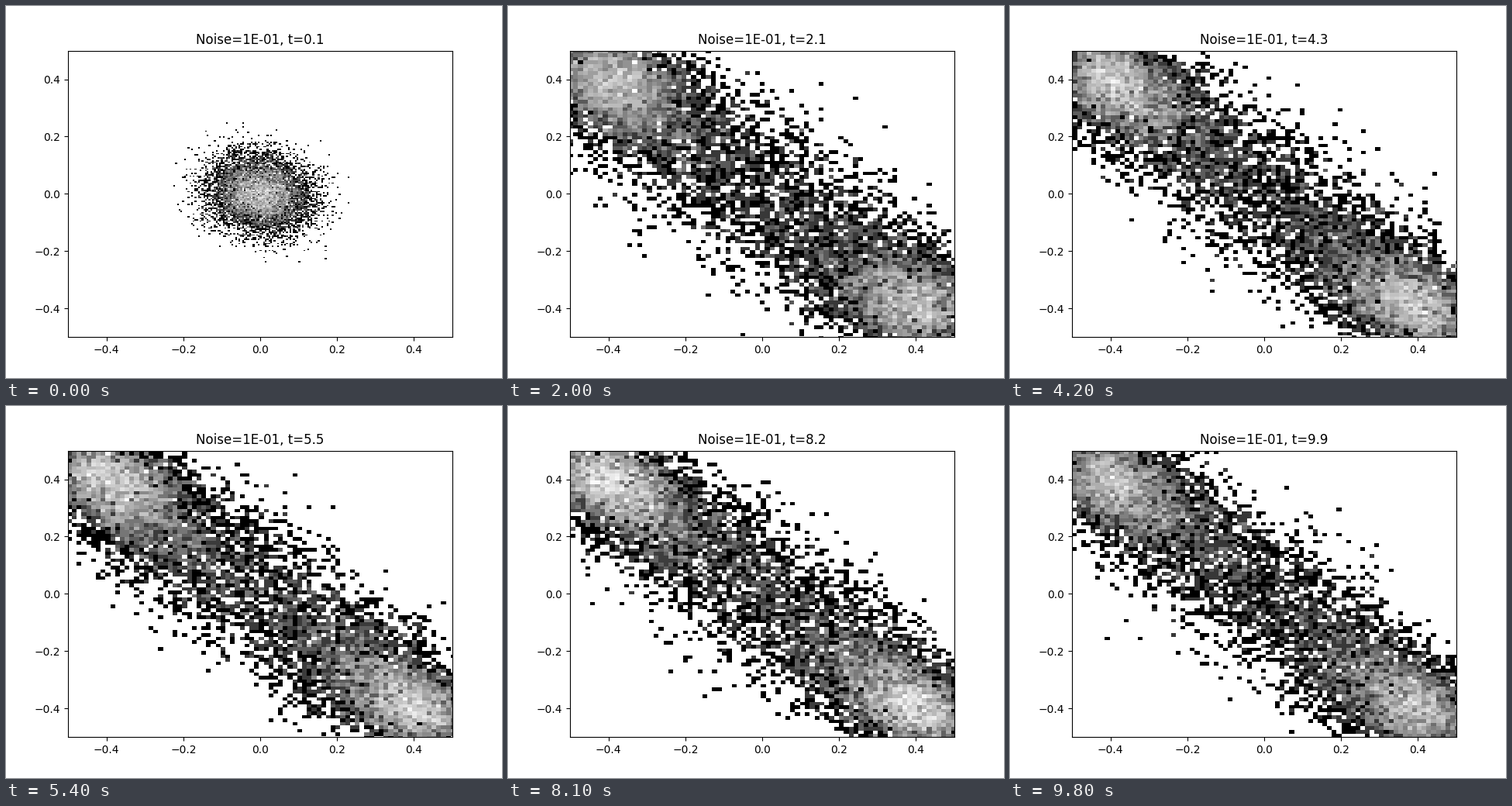
A matplotlib script for the animation above (9900 ms loop, 640 by 480 pixels).

```python
import numpy as np
import matplotlib.pyplot as plt
from matplotlib.animation import FuncAnimation
from matplotlib.colors import LogNorm

NOISE = 0.1
FRAMES = 99
FRAME_DT = 0.1
SUBSTEPS = 10
PARTICLES = 10000
BINS = 100

GROWTH = 1.8     # escape rate along the unstable axis
WELL = 0.57      # distance of each well from the origin
DEPTH = 12       # ratio of drift to diffusion
PINCH = 0.5      # narrowing of the cloud towards the wells
MEMORY = 0.75    # frame-to-frame correlation across the axis


def width(tau):
    """Spread across the unstable axis: swells first, then settles."""
    return 0.105 - 0.043 * np.exp(-4 * tau) + 0.3 * tau**2 * np.exp(-2.2 * tau)


def simulate():
    """Return the particle positions (x, y) for every frame."""
    rng = np.random.default_rng(7)
    along = 0.069 * rng.standard_normal(PARTICLES)
    across = rng.standard_normal(PARTICLES)
    dt = FRAME_DT / SUBSTEPS
    states = []
    for i in range(FRAMES):
        u = width(i * FRAME_DT) * across / (1 + PINCH * (along / WELL) ** 2)
        states.append(((u + along) / np.sqrt(2), (u - along) / np.sqrt(2)))
        for k in range(SUBSTEPS):
            tau = i * FRAME_DT + k * dt
            spread = 2 * GROWTH / DEPTH * (1 - np.exp(-tau / 0.4))
            drift = GROWTH * along * (1 - (along / WELL) ** 8)
            kick = np.sqrt(spread * dt) * rng.standard_normal(PARTICLES)
            along = np.clip(along + drift * dt + kick, -0.9, 0.9)
        across = (MEMORY * across
                  + np.sqrt(1 - MEMORY**2) * rng.standard_normal(PARTICLES))
    return states


states = simulate()
fig, ax = plt.subplots(figsize=(6.4, 4.8), dpi=100)


def draw(i):
    ax.clear()
    x, y = states[i]
    ax.hist2d(x, y, bins=BINS, norm=LogNorm(), cmap="gray")
    ax.set_xlim(-0.5, 0.5)
    ax.set_ylim(-0.5, 0.5)
    ax.set_title(f"Noise={NOISE:.0E}, t={(i + 1) * FRAME_DT:.1f}")


anim = FuncAnimation(fig, draw, frames=FRAMES, init_func=lambda: draw(0),
                     interval=100, repeat=True, repeat_delay=0)
plt.show()
```
